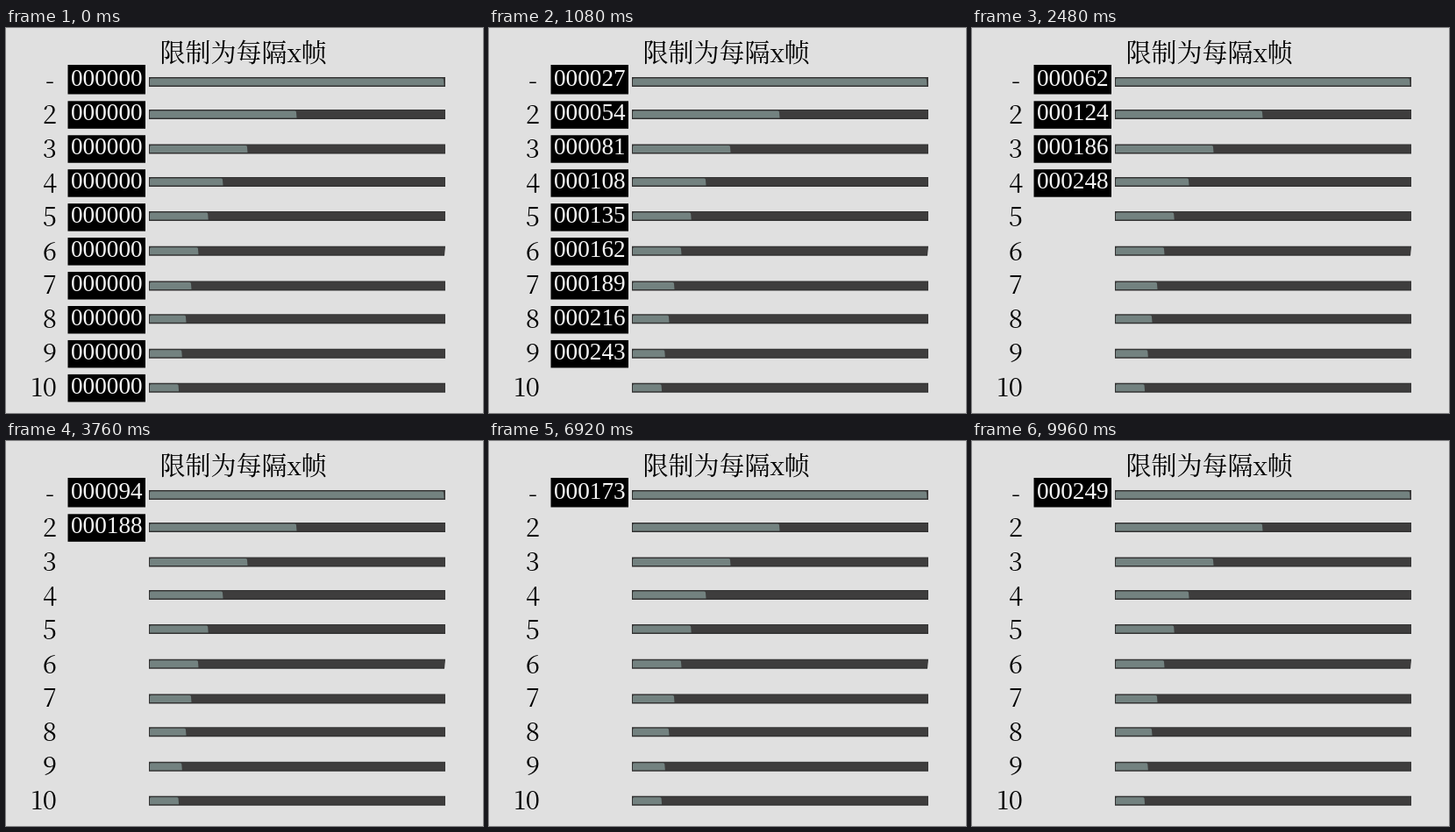
An HTML page for the animation above (10000 ms loop, 544 by 439 pixels).

```html
<!DOCTYPE html>
<html lang="zh-CN">
<meta charset="utf-8">
<title>限制为每隔x帧</title>
<style>
  html, body { margin: 0; height: 100%; overflow: hidden; background: #e0e0e0; }
  svg { display: block; width: 544px; height: 439px; }
  text { font-family: "Noto Serif CJK SC", "Noto Serif SC", "Noto Serif", "Noto Sans CJK SC", serif; font-size: 29px; }
  .count { font-family: "Liberation Serif", serif; font-size: 27.2px; fill: #f4f4f4; }
</style>
<svg id="stage" viewBox="0 0 544 439">
  <text x="175.5" y="38.5">限制为每隔x帧</text>
</svg>
<script>
const FRAME = 40, FRAMES = 250;
const barTops = [56, 93, 132.5, 170, 209, 248.7, 288.5, 326.3, 365.8, 404.8];
const stage = document.getElementById('stage');

function add(parent, tag, attrs, text = '') {
  const el = document.createElementNS('http://www.w3.org/2000/svg', tag);
  for (const key in attrs) el.setAttribute(key, attrs[key]);
  el.textContent = text;
  return parent.appendChild(el);
}

const rows = barTops.map((y, i) => {
  const step = i + 1, end = 163.5 + 336 / step;
  add(stage, 'text', { x: i ? 58 : 55, y: 70 + 38.9 * i, 'text-anchor': 'end' }, i ? step : '-');

  const right = step === 6 ? 500 : 501;
  add(stage, 'path', { d: `M163 ${y}H501L${right} ${y + 11}H163Z`, fill: '#323232' });
  add(stage, 'path', { d: `M164 ${y + 1}H500.5L${right - .5} ${y + 9.5}H164Z`, fill: '#3e3d3d' });
  add(stage, 'path', { d: `M164 ${y + 9.5}V${y + 3}q0-1.5 1.5-1.5H${end - 2}q1.5 0 1.5 1.5l.5 6.5Z`, fill: '#738280' });

  const counter = add(stage, 'g', {});
  const top = i ? 83.3 + 38.95 * (i - 1) : 42;
  add(counter, 'rect', { x: 70.5, y: top, width: 88.5, height: i ? 31.5 : 33.5 });
  const label = add(counter, 'text', { class: 'count', x: 74, y: 66 + 39 * i });
  return { step, counter, label };
});

function draw(now) {
  const frame = Math.floor(now / FRAME) % FRAMES;
  for (const { step, counter, label } of rows) {
    const value = frame * step;
    counter.style.display = value < FRAMES ? '' : 'none';
    label.textContent = String(value).padStart(6, '0');
  }
  requestAnimationFrame(draw);
}
draw(performance.now());
</script>
</html>
```
